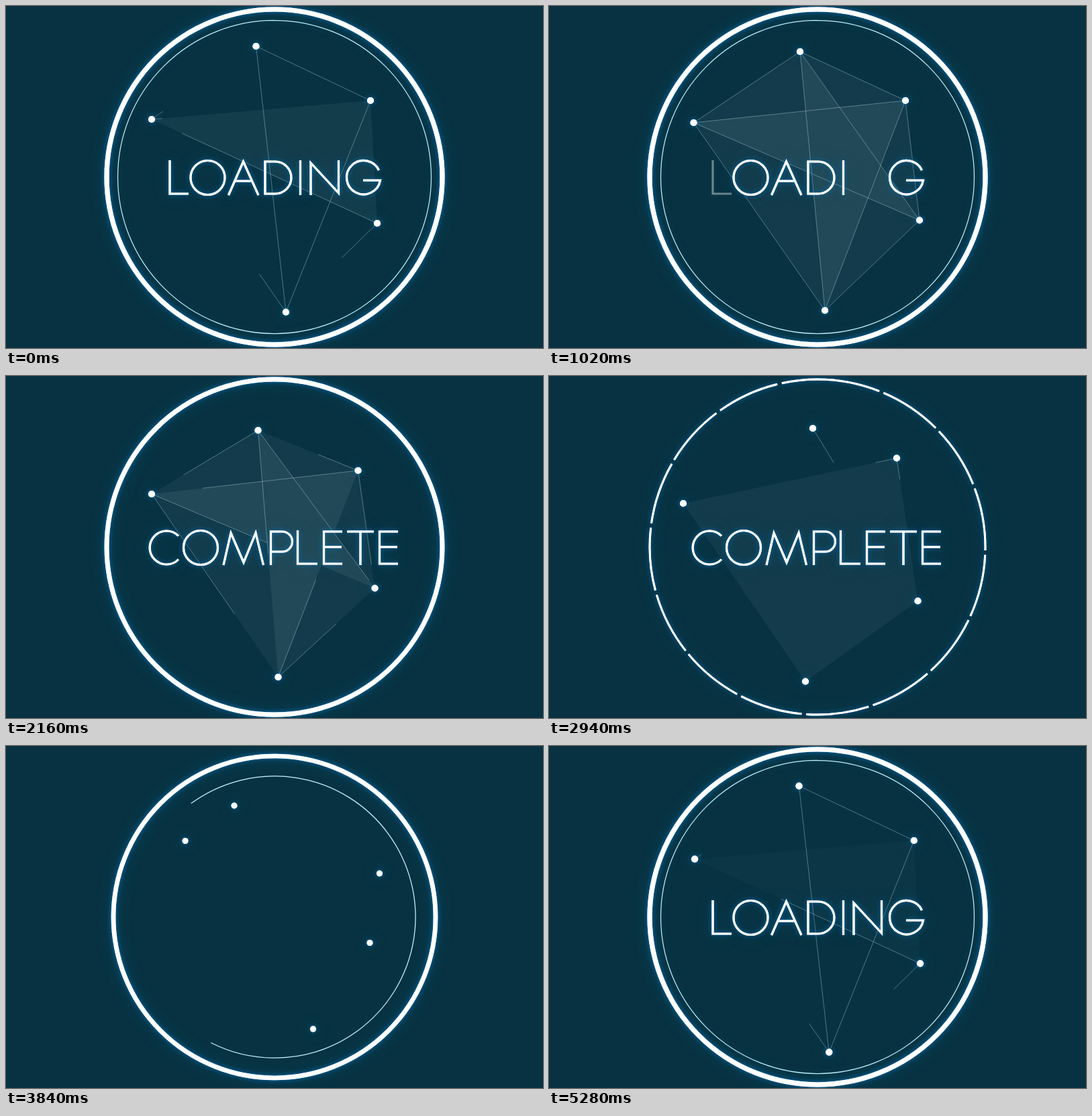
These frames come from a looping animation (800x510 px, 5.34 s). An HTML page with a canvas:

```html
<!DOCTYPE html>
<html lang="en">
<head>
<meta charset="utf-8">
<title>Loading</title>
<style>
html, body { margin: 0; width: 100%; height: 100%; overflow: hidden; background: #083242; }
canvas { display: block; }
</style>
</head>
<body>
<canvas id="stage" width="800" height="510" role="img" aria-label="LOADING, COMPLETE"></canvas>
<script>
const ctx = document.getElementById('stage').getContext('2d');
const LOOP = 5340, START = 3300, CX = 400, CY = 255, TAU = Math.PI * 2;

const clamp = x => Math.max(0, Math.min(1, x));
const ramp = (t, start, dur) => clamp((t - start) / dur);
const smooth = u => u * u * (3 - 2 * u);
const easeOut = u => u >= 1 ? 1 : 1 - 2 ** (-10 * u);
const mix = (a, b, u) => a + (b - a) * u;

// Dot paths: where each dot flies in from, then its drift through KEYS
const KEYS = [4560, 5340, 6360, 7500, 8280];
const PATHS = {
  T: { from: [337.5, 82], via: [[373, 54.5], [372.5, 60], [374, 68], [375.5, 81], [393, 78]] },
  R: { from: [563, 187.3], via: [[553, 141], [543, 141], [531, 141], [524.5, 141], [518, 122.5]] },
  Q: { from: [547.9, 295.1], via: [[553, 329], [553, 324], [552, 319.5], [549.5, 316.5], [549.5, 335.5]] },
  B: { from: [459.9, 429], via: [[420, 458.5], [417, 456.5], [411, 454], [405.5, 449], [382, 455.5]] },
  L: { from: [261.5, 136.8], via: [[218, 164.5], [217, 169], [215.5, 174], [217, 176], [200, 190]] }
};

// Edge, time and length of drawing, end that stays, time and length of leaving
const EDGES = [
  ['TR', 4320, 900, 'R', 6876, 1100],
  ['BT', 4439, 700, 'T', 6950, 1100],
  ['RB', 4493, 650, 'B', 6928, 1100],
  ['QL', 5097, 316, 'L', 6964, 1100],
  ['QB', 4959, 900, 'B', 7024, 1100],
  ['BL', 4940, 1400, 'L', 7065, 1100],
  ['LT', 5094, 1200, 'T', 7100, 1100],
  ['LR', 5189, 1150, 'R', 6969, 1630],
  ['TQ', 5360, 800, 'T', 7318, 1350],
  ['RQ', 5400, 700, 'R', 7024, 1660]
];

// Faces: corners, strength, fade in, fade out
const FACES = [
  ['LRQ', .06, 5250, 90, 5650, 500],
  ['LRQB', .05, 5650, 500, 8300, 260],
  ['LTR', .05, 5600, 600, 7600, 500],
  ['LRBTQ', .075, 5700, 600, 7550, 600]
];

// Letters: stroke, time of appearing, time of going
const circle = (x, y, r) => `M${x - r} ${y}a${r} ${r} 0 1 1 ${2 * r} 0a${r} ${r} 0 1 1 ${-2 * r} 0Z`;
const LETTERS = [
  ['M244 230V280H272', 4700, 6340],
  [circle(300.5, 256, 25.5), 4640, 6540],
  ['M331.5 282L353.5 232L376 282M340 261H367', 4260, 6600],
  ['M386 232H401A24 24 0 0 1 401 280H386Z', 4540, 6420],
  ['M438.5 230V282', 4200, 6660],
  ['M454 282V234L495.5 279V230', 4800, 6040],
  ['M555.5 245A25.2 25.2 0 1 0 557.5 260H532', 4250, 6480],
  ['M257 238.5A25 25 0 1 0 257 273.5', 6950, 8360],
  [circle(290, 256, 25.5), 6820, 8300],
  ['M324 282L335 234L354 278L372 234L383.5 282', 7080, 8330],
  ['M394.5 282V232H411.5A15 15 0 0 1 411.5 262H394.5', 6860, 8290],
  ['M434.5 230V280H464', 7020, 8350],
  ['M501 232H473.5V280H501M473.5 255H500', 6800, 8310],
  ['M508 232H548M528 232V282', 7120, 8340],
  ['M584 232H556.5V280H584M556.5 255H583', 6900, 8300]
].map(([d, on, off]) => ({ path: new Path2D(d), on, off }));

const FLICKER_IN = [.22, .8, 0, .3], FLICKER_OUT = [.4, .9, 0, .3];

function letterAlpha(t, { on, off }) {
  if (t < on) return 0;
  if (t < off) return FLICKER_IN[Math.floor((t - on) / 60)] ?? 1;
  return FLICKER_OUT[Math.floor((t - off) / 60)] ?? 0;
}

function drift(via, axis, t) {
  const last = KEYS.length - 1;
  const slope = i => {
    const a = Math.max(0, i - 1), b = Math.min(last, i + 1);
    return (via[b][axis] - via[a][axis]) / (KEYS[b] - KEYS[a]);
  };
  if (t >= KEYS[last]) return via[last][axis] + slope(last) * (t - KEYS[last]);
  let i = 0;
  while (t >= KEYS[i + 1]) i++;
  const h = KEYS[i + 1] - KEYS[i], u = (t - KEYS[i]) / h;
  return mix(via[i][axis], via[i + 1][axis], smooth(u))
    + h * u * (1 - u) * ((1 - u) * slope(i) - u * slope(i + 1))
    - u * (1 - u) * (1 - 2 * u) * (via[i + 1][axis] - via[i][axis]) * 0;
}

function place({ from, via }, t, scale) {
  const far = ((KEYS[0] - t) / 720) ** 2;
  return [CX, CY].map((c, k) => {
    const p = t < KEYS[0] ? mix(via[0][k], from[k], far) : drift(via, k, t);
    return c + (p - c) * scale;
  });
}

function glow(blur, color) {
  ctx.shadowBlur = blur;
  ctx.shadowColor = color;
}

function glowing(paint) {
  glow(22, 'rgba(6,120,150,.45)');
  paint();
  glow(7, 'rgba(8,120,205,.75)');
  paint();
  glow(0, 'transparent');
}

function drawNet(t, dots) {
  for (const [corners, strength, on, onDur, off, offDur] of FACES) {
    ctx.fillStyle = `rgba(205,235,235,${strength * (ramp(t, on, onDur) - ramp(t, off, offDur))})`;
    ctx.beginPath();
    for (const c of corners) ctx.lineTo(...dots[c]);
    ctx.fill();
  }
  ctx.strokeStyle = 'rgba(215,235,240,.36)';
  ctx.lineWidth = 1;
  for (const [[a, b], on, onDur, stay, off, offDur] of EDGES) {
    const gone = smooth(ramp(t, off, offDur));
    const lo = stay === b ? gone : 0;
    const hi = smooth(ramp(t, on, onDur)) - (stay === a ? gone : 0);
    if (hi <= lo) continue;
    const at = u => [0, 1].map(k => mix(dots[a][k], dots[b][k], u));
    ctx.beginPath();
    ctx.moveTo(...at(lo));
    ctx.lineTo(...at(hi));
    ctx.stroke();
  }
}

function drawDots(t, dots, scale) {
  ctx.fillStyle = '#fff';
  ctx.globalAlpha = 1 - ramp(t, 8330, 230);
  for (const [x, y] of Object.values(dots)) glowing(() => {
    ctx.beginPath();
    ctx.arc(x, y, 5.1 * scale ** 3, 0, TAU);
    ctx.fill();
  });
  ctx.globalAlpha = 1;
}

function drawText(t) {
  ctx.strokeStyle = '#fff';
  ctx.lineWidth = 3.2;
  for (const letter of LETTERS) {
    const alpha = letterAlpha(t, letter);
    if (!alpha) continue;
    ctx.globalAlpha = alpha;
    if (alpha < .5) ctx.stroke(letter.path);
    else glowing(() => ctx.stroke(letter.path));
  }
  ctx.globalAlpha = 1;
}

function drawInnerRing(t) {
  if (t > 6900) return;
  const r = 233.5 * easeOut(ramp(t, 3210, 1900)) + 16.5 * ramp(t, 6500, 400) ** 2;
  const gap = TAU * (1 - ramp(t, 3188, 2086)) ** 3;
  const start = -TAU / 4 - gap * .31;
  ctx.strokeStyle = '#c4f3ff';
  ctx.lineWidth = 1.25;
  ctx.beginPath();
  ctx.arc(CX, CY, r, start, start + TAU - gap);
  ctx.stroke();
}

function drawOuterRing(t, scale) {
  const width = 7.2 * scale ** 2 * (1 - ramp(t, 7200, 1400) ** 2);
  if (width <= 0) return;
  const step = 101.1, gap = step * ramp(t, 8150, 500) ** 2;
  ctx.strokeStyle = '#fff';
  ctx.lineWidth = width;
  ctx.setLineDash(gap ? [step - gap, gap] : []);
  ctx.beginPath();
  ctx.arc(CX, CY, 250 * scale, -TAU / 4, TAU * .75);
  glowing(() => ctx.stroke());
  ctx.setLineDash([]);
}

function draw(now) {
  const t = START + (now + LOOP - START) % LOOP;
  const scale = easeOut(ramp(t, START, 1163));
  const dots = {};
  for (const name in PATHS) dots[name] = place(PATHS[name], t, scale);
  ctx.fillStyle = '#083242';
  ctx.fillRect(0, 0, 800, 510);
  drawNet(t, dots);
  drawDots(t, dots, scale);
  drawText(t);
  drawInnerRing(t);
  drawOuterRing(t, scale);
}

let origin;
function tick(now) {
  origin ??= now;
  draw(now - origin);
  requestAnimationFrame(tick);
}
requestAnimationFrame(tick);
</script>
</body>
</html>
```
